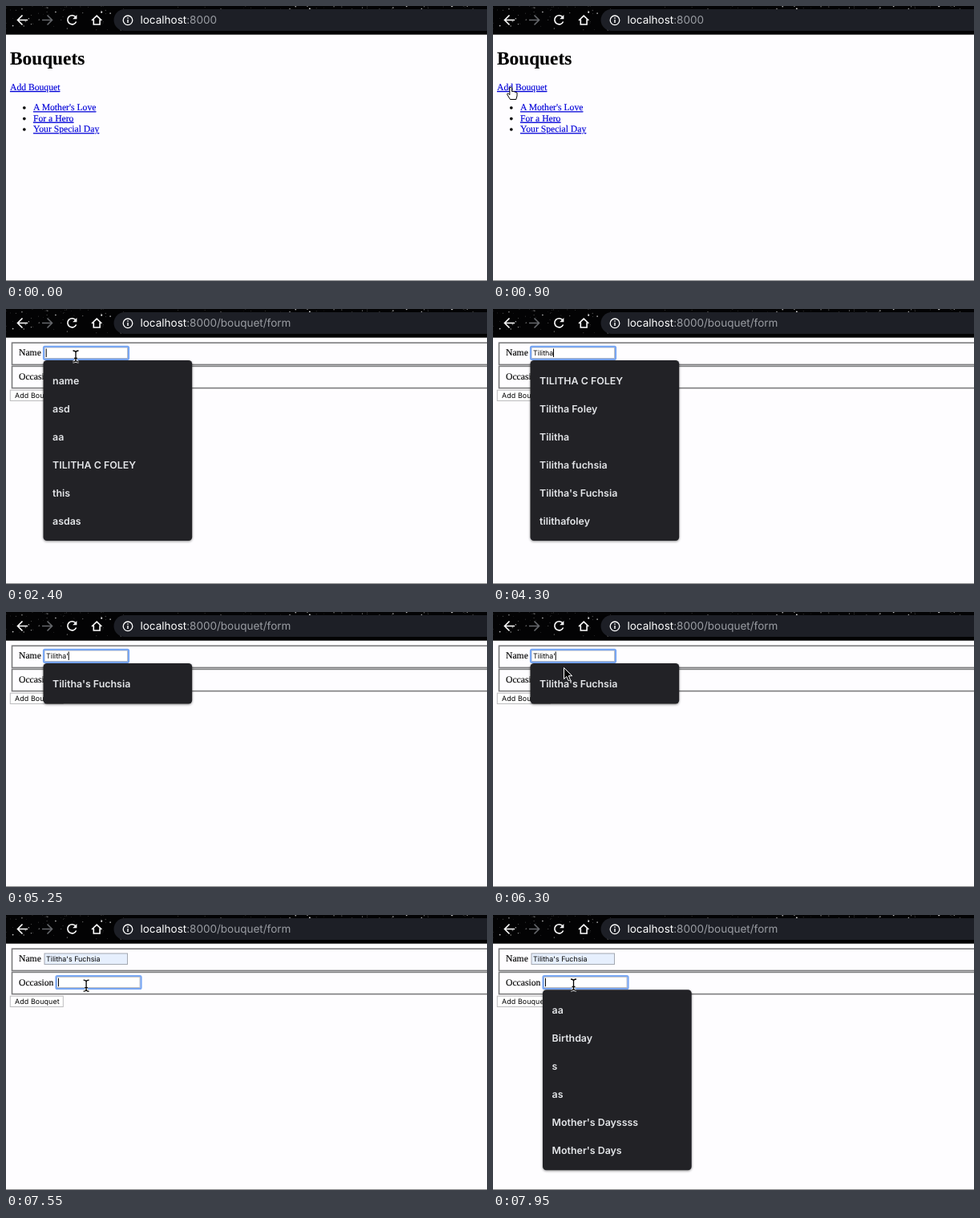
An HTML page for the animation above (8 s loop, 600x343 px).

```html
<!DOCTYPE html>
<html lang="en">
<head>
<meta charset="utf-8">
<title>Bouquet form</title>
<style>
  html, body { margin: 0; width: 100%; height: 100%; overflow: hidden; background: #fefdff; }
  svg { display: block; width: 600px; height: 343px; text-rendering: geometricPrecision; }
  .serif { font: 11.65px "Liberation Serif", Times, serif; stroke: #000; stroke-width: .15; }
  .ui { font: 8.9px Inter, sans-serif; }
  .link { fill: #0000d8; stroke: #0000d8; text-decoration: underline; }
  .url { font: 13.5px Inter, sans-serif; fill: #fff; }
  .menu text { font: 600 12.4px Inter, sans-serif; fill: #e4e6e9; }
  .icon { fill: none; stroke: #fff; stroke-width: 1.6; }
  .set { fill: none; stroke: #7c7c7e; stroke-width: 1.6; }
</style>
</head>
<body>
<svg viewBox="0 0 600 343">
  <defs>
    <filter id="shadow" x="-10%" y="-10%" width="120%" height="125%">
      <feDropShadow dx="0" dy="1" stdDeviation="1.5" flood-opacity=".45"/>
    </filter>
    <path id="beam" d="M-3.5 -7Q0 -7 0 -4.5Q0 -7 3.5 -7M0 -4.5V4.5M-3.5 7Q0 7 0 4.5Q0 7 3.5 7M-2 2.5H2"/>
  </defs>
  <rect width="600" height="343" fill="#fefdff"/>
  <rect width="600" height="35.7" fill="#030304"/>
  <g id="stars" fill="#fff"></g>
  <rect x="134.5" y="4" width="500" height="27" rx="13.5" fill="#1d1f26"/>
  <g class="icon">
    <path d="M27 17.5H15M20.5 11.5L14.5 17.5L20.5 23.5"/>
    <path d="M45 17.5H57M51.5 11.5L57.5 17.5L51.5 23.5" stroke="#66686c"/>
    <path d="M87 14A5.6 5.6 0 1 0 87.6 19.5"/>
    <path d="M88.4 11V16.2H83.2Z" fill="#fff" stroke="none"/>
    <path d="M107 18L113.2 12.2L119.4 18M109.3 16.5V23H117.1V16.5"/>
    <circle cx="152" cy="17.8" r="5.8" stroke-width="1.3"/>
    <path d="M152 17V21M152 14.3V15.8" stroke-width="1.4"/>
  </g>
  <text class="url" x="167.5" y="22.3">localhost<tspan id="path" fill="#9a9da3"></tspan></text>

  <g id="list" class="serif">
    <text x="5" y="73" style="font-size:23.3px;font-weight:bold">Bouquets</text>
    <text class="link" x="5" y="105">Add Bouquet</text>
    <circle cx="22.8" cy="127" r="1.8"/>
    <circle cx="22.8" cy="140.6" r="1.8"/>
    <circle cx="22.8" cy="154" r="1.8"/>
    <text class="link" x="34" y="130.3">A Mother's Love</text>
    <text class="link" x="34" y="143.8">For a Hero</text>
    <text class="link" x="34" y="157.2">Your Special Day</text>
  </g>

  <g id="form">
    <rect class="set" x="7.5" y="42.2" width="620" height="27.2"/>
    <rect class="set" x="7.5" y="71.4" width="620" height="27.2"/>
    <text class="serif" x="16" y="58.3">Name</text>
    <text class="serif" x="16" y="87.5">Occasion</text>
    <rect id="nameBox" x="48" y="48" width="103.5" height="13.5"/>
    <rect x="63.5" y="77.3" width="103.5" height="13.2" fill="#fff" stroke="#bcbcbe"/>
    <rect x="5.3" y="101.2" width="66" height="13.3" fill="#fff" stroke="#bcbcbe"/>
    <text class="ui" x="11" y="110.8" letter-spacing=".1">Add Bouquet</text>
    <rect id="ring" width="106" height="16" rx="1.5" fill="none" stroke-width="2.2"/>
    <text id="value" class="ui" x="50" y="58"></text>
    <rect id="caret" width="1" height="10.5"/>
    <g id="menu" class="menu"></g>
  </g>

  <g id="arrow"><path d="M0 0V14L3.3 11L5.6 16.2L8 15.2L5.8 10.2H10.2Z" stroke="#fff"/></g>
  <g id="hand"><path d="M-1.4 1Q0 -1 1.4 1V5.5L3.4 5.6L5.6 6.2L7.8 7.2V11L6.6 15.5H-.8L-4.6 9.2Q-4.4 7.2 -2.6 8.6L-1.4 9.8Z" fill="#fff" stroke="#000"/></g>
  <g id="ibeam" fill="none">
    <use href="#beam" stroke="#fff" stroke-width="2.8"/>
    <use href="#beam" stroke="#000" stroke-width="1.3"/>
  </g>
  <rect y="342" width="600" height="1" fill="#8b8b8d"/>
</svg>
<script>
const $ = id => document.getElementById(id);
const LOOP = 8000, STEP = 50, FORM_AT = 1300, HOVER_AT = 6350, PICKED = 6500, NEXT_FIELD = 7550;
const FULL = "Tilitha's Fuchsia";

// [time, letters shown in the name field]
const typing = [[2350, 0], [3200, 1], [3400, 2], [3500, 3], [3750, 4], [3900, 5], [4100, 6], [4300, 7], [5250, 8], [PICKED, 17]];

const matches = ["TILITHA C FOLEY", "Tilitha Foley", "Tilitha", "Tilitha fuchsia", FULL, "tilithafoley"];
// [time, left, top, items]
const menus = [
  [0, 0, 0, []],
  [2400, 46.5, 64, ["name", "asd", "aa", matches[0], "this", "asdas"]],
  [3250, 46.5, 64, ["this", ...matches.slice(0, 4), "test"]],
  [3450, 46.5, 64, matches],
  [5250, 46.5, 64, [FULL]],
  [PICKED, 0, 0, []],
  [7600, 62, 93.2, ["aa", "Birthday", "s", "as", "Mother's Dayssss", "Mother's Days"]]
];

// [time, x, y, pointer shape until the next entry]
const route = [
  [0, 289, 308, ""], [50, 289, 308, "arrow"], [250, 232, 250, "arrow"], [450, 120, 165, "arrow"],
  [600, 50, 116, "arrow"], [700, 28, 103, "hand"], [850, 20, 101, "hand"], [FORM_AT, 40, 101, "arrow"],
  [1750, 45, 99, "arrow"], [1850, 52, 106, "arrow"], [1950, 80, 93, "arrow"], [2050, 100, 66, "ibeam"],
  [2200, 87, 59, "ibeam"], [3200, 87, 59, ""], [6050, 87, 59, "ibeam"], [6250, 87, 59, "arrow"],
  [HOVER_AT, 90, 80, "arrow"], [PICKED, 92, 91, "ibeam"], [6750, 96.5, 80.5, "ibeam"], [7000, 96, 86, "ibeam"],
  [7100, 96, 91.5, "arrow"], [7300, 96, 91.5, "ibeam"], [7450, 100, 88.5, "ibeam"], [7950, 100.5, 87, "ibeam"],
  [LOOP, 100.5, 87, "ibeam"]
];

const latest = (rows, t) => rows.filter(r => r[0] <= t).pop();
const show = (el, on) => el.style.display = on ? "" : "none";
const set = (el, attrs) => { for (const k in attrs) el.setAttribute(k, attrs[k]); };

let seed = 7;
const rnd = () => (seed = seed * 16807 % 2147483647) / 2147483647;
let dots = "";
for (let i = 0; i < 260; i++)
  dots += `<circle cx="${rnd() * 600}" cy="${rnd() ** 1.2 * 31}" r="${.3 + rnd() ** 3 * .8}" opacity="${.25 + rnd() * .65}"/>`;
$("stars").innerHTML = dots;

function drawMenu([, x, y, items], hover) {
  const h = items.length * 34.9 + 15.6;
  $("menu").innerHTML = items.length ? `
    <rect x="${x}" y="${y}" width="185.7" height="${h}" rx="4.5" fill="#222427" filter="url(#shadow)"/>
    ${hover ? `<rect x="${x}" y="${y + 7.8}" width="185.7" height="34.9" fill="#3f4144"/>` : ""}
    ${items.map((s, i) => `<text x="${x + 11.6}" y="${y + 30 + i * 34.9}">${s}</text>`).join("")}` : "";
}

function drawPointer(t) {
  const i = route.findIndex(r => r[0] > t);
  const [t0, x0, y0, shape] = route[i - 1], [t1, x1, y1] = route[i];
  const k = (t - t0) / (t1 - t0);
  for (const id of ["arrow", "hand", "ibeam"]) {
    show($(id), id === shape);
    set($(id), { transform: `translate(${x0 + (x1 - x0) * k} ${y0 + (y1 - y0) * k})` });
  }
}

function draw(t) {
  const onForm = t >= FORM_AT, second = t >= NEXT_FIELD;
  const filled = t >= HOVER_AT, hover = filled && t < PICKED;
  show($("list"), !onForm);
  show($("form"), onForm);
  $("path").textContent = ":8000" + (onForm ? "/bouquet/form" : "");

  const [typedAt, count] = latest(typing, t) || [Infinity, 0];
  $("value").textContent = FULL.slice(0, hover ? FULL.length : count);
  set($("nameBox"), { fill: filled ? "#e6effd" : "#fff", stroke: filled ? "#a3a8b2" : "#bcbcbe" });

  show($("ring"), t >= 2350);
  set($("ring"), { x: second ? 62.5 : 47, y: second ? 76 : 46.8, stroke: filled && !second ? "#6394e6" : "#79a7f3" });

  const since = t - (second ? NEXT_FIELD : typedAt);
  const width = $("value").textContent ? $("value").getComputedTextLength() : 0;
  show($("caret"), since >= 0 && since % 1000 < 500);
  set($("caret"), { x: second ? 65 : 49.7 + width, y: second ? 78.7 : 49.5 });

  drawMenu(latest(menus, t), hover);
  drawPointer(t);
}

const start = performance.now();
let last = -1;
function tick(now) {
  const t = Math.floor(Math.max(0, now - start) % LOOP / STEP) * STEP;
  if (t !== last) draw(last = t);
  requestAnimationFrame(tick);
}
tick(start);
</script>
</body>
</html>
```
